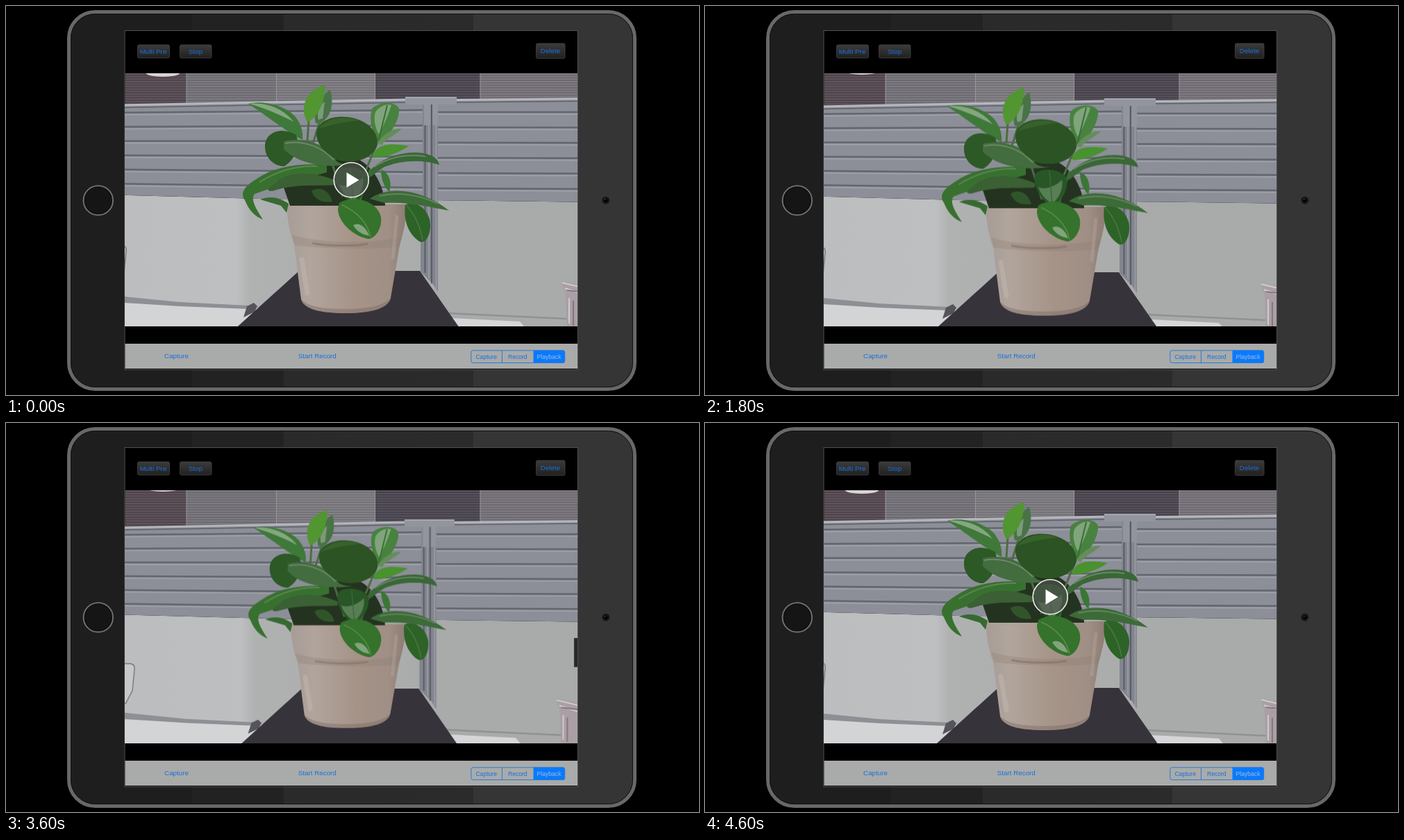
Write an HTML page that moves like this. It is 998 by 561 pixels and loops after 4.8 s.

```html
<!DOCTYPE html>
<html lang="en">
<head>
<meta charset="utf-8">
<title>Tablet camera playback</title>
<style>
  html, body { margin: 0; width: 100%; height: 100%; overflow: hidden; background: #000; }
  svg { display: block; width: 998px; height: 561px; }
  text { font: 9.8px "Liberation Sans", Arial, sans-serif; fill: #1a70dc; text-anchor: middle; }
  .seg text { font-size: 8.6px; }
  .photo, .play, .wall, .plant, .lamp { animation: 4800ms step-end infinite; }
  .photo { animation-name: photo; }
  .play { animation-name: play; }
  .wall { animation-name: wall; }
  .plant { animation-name: plant; }
  .lamp { animation-name: lamp; }

  @keyframes photo {
    0%, 37.5%, 87.5%, 100% { visibility: visible; }
    16.66%, 79.16% { visibility: hidden; }
  }
  @keyframes play {
    0%, 79.16%, 100% { visibility: visible; }
    29.16% { visibility: hidden; }
  }
  @keyframes lamp {
    0%, 87.5%, 100% { transform: translate(0, 0); }
    37.5% { transform: translate(0, -3px); }
  }
  /* The hand-held clip drifts back, at five pictures a second */
  @keyframes wall {
    0%, 87.5%, 100% { transform: translate(0, 0) scale(1, 1); }
    37.5% { transform: translate(0, 2px) scale(1, 1); animation-timing-function: steps(3); }
    50% { transform: translate(6px, 7px) scale(.992, .992); animation-timing-function: steps(4); }
    66.66% { transform: translate(17.5px, 11.7px) scale(.968, .972); }
  }
  @keyframes plant {
    0%, 87.5%, 100% { transform: translate(0, 0) scale(1, 1); }
    37.5% { transform: translate(0, 3.6px) scale(1, 1); animation-timing-function: steps(3); }
    50% { transform: translate(9.5px, 11px) scale(.987, .984); animation-timing-function: steps(4); }
    66.66% { transform: translate(21.7px, 16.5px) scale(.96, .956); }
  }
</style>
</head>
<body>
<svg viewBox="0 0 998 561">
  <defs>
    <linearGradient id="bezel" gradientUnits="userSpaceOnUse" x1="0" x2="1000" y1="0" y2="0">
      <stop offset=".268" stop-color="#1e1e1e"/><stop offset=".268" stop-color="#222"/>
      <stop offset=".4" stop-color="#222"/><stop offset=".4" stop-color="#2a2a2a"/>
      <stop offset=".673" stop-color="#2b2b2b"/><stop offset=".673" stop-color="#353535"/>
    </linearGradient>
    <linearGradient id="key" x2="0" y2="1">
      <stop offset="0" stop-color="#3b3b3b"/><stop offset="1" stop-color="#212121"/>
    </linearGradient>
    <linearGradient id="clay">
      <stop offset="0" stop-color="#a79d96"/><stop offset=".2" stop-color="#b1a59d"/>
      <stop offset=".55" stop-color="#a69488"/><stop offset=".85" stop-color="#a08f85"/>
      <stop offset="1" stop-color="#8b7b72"/>
    </linearGradient>
    <linearGradient id="lowLeft">
      <stop offset="0" stop-color="#bcbdbf"/><stop offset=".4" stop-color="#bebfc0"/>
      <stop offset=".44" stop-color="#b0b2b2"/><stop offset="1" stop-color="#aaacac"/>
    </linearGradient>
    <pattern id="blind" width="8" height="3.6" patternUnits="userSpaceOnUse">
      <path d="M0 1H8" stroke="#fff" stroke-opacity=".13"/>
      <path d="M0 2.8H8" stroke="#000" stroke-opacity=".17"/>
    </pattern>
    <clipPath id="frame"><rect x="171.5" y="97" width="651.5" height="364.5"/></clipPath>
  </defs>

  <rect width="998" height="561"/>
  <rect x="90.5" y="8.5" width="815" height="544" rx="38" fill="url(#bezel)" stroke="#686868" stroke-width="5"/>
  <rect x="93.5" y="11.5" width="809" height="538" rx="35" fill="none" stroke="#111"/>
  <rect x="171" y="35.5" width="652.5" height="489" stroke="#505050"/>

  <circle cx="132.8" cy="280.4" r="21.2" fill="#0b0b0b" stroke="#707070" stroke-width="2"/>
  <circle cx="132.8" cy="280.4" r="19" fill="#151515"/>
  <circle cx="863.8" cy="280.2" r="5.5" fill="#161616"/>
  <circle cx="863.8" cy="280.2" r="2.6" fill="#000"/>
  <circle cx="862.8" cy="279" r="1" fill="#3b3f3c"/>

  <g class="photo" clip-path="url(#frame)">
    <g>
      <path d="M171 97H260V160H171z" fill="#564951"/>
      <path d="M260 97H389V160H260z" fill="#75727a"/>
      <path d="M389 97H531V160H389z" fill="#7d7b80"/>
      <path d="M531 97H683V160H531z" fill="#4b4650"/>
      <path d="M683 97H823V160H683z" fill="#77727a"/>
      <path d="M171 97H823V160H171z" fill="url(#blind)"/>
      <path d="M260 97V150M389.5 97V150M531.5 97V150M683 97V150" stroke="#99979d"/>
      <ellipse class="lamp" cx="226" cy="97" rx="24" ry="5" fill="#d8d5d6"/>
    </g>

    <g class="wall">
      <path d="M140 272L400 279H620V480H140z" fill="url(#lowLeft)"/>
      <path d="M616 280L850 283V480H616z" fill="#a8aba9"/>
      <path d="M140 143.5L576 134H620V281L400 279L140 272z" fill="#8c8e98"/>
      <path d="M616 136L850 133V283L616 280z" fill="#8c8e98"/>
      <g id="slats"></g>
      <path d="M140 143.5L578 135" stroke="#b6b8be" stroke-width="3"/>
      <path d="M645 135.5L850 133.5" stroke="#b6b8be" stroke-width="3"/>
      <path d="M140 147L578 139M645 139L850 137" stroke="#5e606a" stroke-width="1.5"/>

      <path d="M600 135H622V412L614 400L597 383V281H600z" fill="#83858e"/>
      <path d="M603.5 146V385M613 140V400" stroke="#595b65" stroke-width="2"/>
      <path d="M609 140V392M619.5 146V408" stroke="#9799a2" stroke-width="2"/>
      <path d="M575 131.5H649V142H622V172H614V142H611V172H602V142H575z" fill="#92959d"/>
      <path d="M575 132H649" stroke="#b0b2b9" stroke-width="1.5"/>

      <path d="M140 427L370 436V490H140z" fill="#d3d4d6"/>
      <path d="M140 416L250 427L350 432V437L250 433L140 426z" fill="#8d8f95"/>
      <path d="M640 450L740 455L748 464V490H640z" fill="#d5d6d7"/>
      <path d="M636 443L850 453" stroke="#8f9196" stroke-width="2.5"/>
      <path d="M150 345H167Q174 346 173 354L170 385L160 404H150z" fill="#c7c8ca" stroke="#77797e" stroke-width="1.5"/>
      <path d="M827 307H850V350H827z" fill="#28272c"/>

      <path d="M800 397L850 406V475H808L806 415z" fill="#a99fa5"/>
      <path d="M801 399L850 411M805 407L850 422M811 421V458" stroke="#d0cbd0" stroke-width="2"/>
      <path d="M808 410L850 415M817 425V461" stroke="#85767f" stroke-width="2"/>

      <path d="M342 449L347 433L357 428L362 433L358 441z" fill="#55545b"/>
      <path d="M314 480L422 382H596L664 480z" fill="#37333b"/>
    </g>

    <g class="plant">
      <path d="M404 286H578C577 306 572 328 567 345L554 421C551 436 526 443 489 443C452 443 429 437 425 423L415 345C409 330 405 308 404 286z" fill="url(#clay)"/>
      <path d="M412 330C450 342 520 344 570 333L567 347C525 352 450 350 416 345z" fill="#8d7a70" opacity=".3"/>
      <path d="M441 342C460 346 500 347 521 343" fill="none" stroke="#806a60" stroke-width="3" opacity=".5"/>
      <path d="M426 366L434 414" stroke="#c8bfb8" stroke-width="7" stroke-linecap="round" opacity=".4"/>
      <path d="M563 302L557 365" stroke="#bfb4ac" stroke-width="5" opacity=".3"/>
      <path d="M425 423C429 437 452 443 489 443C526 443 551 436 554 421C545 432 520 437 489 437C455 437 435 433 425 423z" fill="#75645c" opacity=".4"/>

      <path d="M400 262C415 240 455 218 500 218C530 228 545 262 546 288H409z" fill="#24331f"/>
      <path d="M436 165L434 194M452 166L442 198M535 196L517 240M470 228L485 275M525 235L510 280" fill="none" stroke="#4d6c42" stroke-width="3"/>
      <path d="M446 169C440 150 455 128 467 121C472 140 470 158 452 170z" fill="#487346"/>
      <path d="M450 164C446 152 454 141 459 138L456 162z" fill="#93ab92" opacity=".7"/>
      <path d="M434 168C424 150 427 124 459 114C460 135 452 158 434 168z" fill="#519631"/>
      <path d="M349 141C375 135 405 146 417 160C426 172 428 182 427 193C405 182 375 158 349 141z" fill="#3f7939"/>
      <path d="M351 141C376 138 402 150 414 167C398 158 374 148 351 141z" fill="#a3b9a0" opacity=".7"/>
      <path d="M418 186C400 174 374 180 373 201C372 220 388 232 401 231C415 222 424 205 418 186z" fill="#2c5926"/>
      <path d="M527 148C540 136 562 138 566 148C567 165 552 190 535 198C528 180 522 165 527 148z" fill="#47823f"/>
      <path d="M532 153C539 143 550 141 555 143C549 162 541 178 537 185C531 175 529 162 532 153z" fill="#9fb79c" opacity=".65"/>
      <path d="M549 143L536 196" stroke="#396d35" stroke-width="2"/>
      <path d="M534 198C545 183 558 176 570 177C562 185 551 189 541 200z" fill="#648d5b"/>
      <path d="M529 219C530 200 550 197 580 202C565 212 548 218 529 219z" fill="#48922f"/>
      <path d="M518 247C530 222 570 208 600 212C615 215 622 220 624 229C600 221 570 222 545 232C535 238 528 246 518 250z" fill="#3a6736"/>
      <path d="M530 232C552 218 578 213 604 217" fill="none" stroke="#7d9679" stroke-width="2" opacity=".7"/>

      <path d="M462 229C420 226 385 232 360 250C340 262 338 272 344 280C350 295 358 303 370 308C359 291 352 279 358 271C378 264 405 255 462 240z" fill="#38712f"/>
      <path d="M448 231C420 230 393 236 365 254" fill="none" stroke="#6b8f60" stroke-width="2" opacity=".7"/>
      <path d="M475 252C440 236 400 240 388 256C372 264 376 270 390 265C420 256 455 260 475 258z" fill="#3a6034"/>
      <path d="M366 279C380 273 394 276 407 285L404 298L396 288z" fill="#366a30"/>
      <path d="M440 267C450 260 465 264 470 282C458 284 445 281 440 267z" fill="#31552a"/>
      <path d="M400 195C430 188 462 200 474 220C475 227 490 230 500 228C470 234 420 230 400 206z" fill="#436c3f"/>
      <path d="M402 198C430 193 456 204 472 222" fill="none" stroke="#7d9679" stroke-width="2" opacity=".7"/>
      <path d="M447 184C448 162 480 155 505 163C528 170 540 190 533 205C524 222 500 228 477 222C460 212 447 200 447 184z" fill="#2c5323"/>
      <path d="M450 177C462 160 490 158 508 165C490 167 468 171 450 177z" fill="#37632b"/>
      <path d="M540 236C552 240 556 255 552 268C545 262 540 250 540 236z" fill="#3a7634"/>
      <path d="M575 287C590 278 612 295 611 318C610 335 603 342 596 340C580 330 572 310 575 287z" fill="#2d6327"/>
      <path d="M577 288C588 300 596 316 600 337" fill="none" stroke="#4b7a3f" stroke-width="1.5"/>
      <path d="M524 278C550 258 600 264 638 295C610 290 580 282 545 284z" fill="#3d6b38"/>
      <path d="M538 274C565 267 597 273 622 285" fill="none" stroke="#748f70" stroke-width="2" opacity=".7"/>
      <path d="M475 240C480 230 510 228 521 245C524 262 512 280 500 286C485 278 472 258 475 240z" fill="#295626"/>
      <path d="M480 257C488 263 506 256 514 247C517 262 507 277 500 281C490 276 483 267 480 257z" fill="#88a586" opacity=".5"/>
      <path d="M496 234L500 284" stroke="#3a6a35" stroke-width="1.5"/>
      <path d="M480 284C500 272 535 280 540 305C542 322 530 336 522 336C500 332 478 312 478 292z" fill="#35722c"/>
      <path d="M484 287C505 296 521 313 525 333" fill="none" stroke="#5b8d4d" stroke-width="1.5"/>
      <path d="M500 316C508 311 518 318 523 331C513 330 505 325 500 316z" fill="#a3b9a0" opacity=".7"/>
    </g>
  </g>

  <g class="play">
    <circle cx="497.2" cy="250.8" r="25" fill="#555" fill-opacity=".6" stroke="#eee" stroke-width="1.6"/>
    <path d="M490.5 240V261.8L508.5 250.9z" fill="#fff"/>
  </g>

  <g fill="url(#key)" stroke="#444" stroke-width=".8">
    <rect x="189.5" y="56" width="46" height="19" rx="2"/>
    <rect x="250.5" y="56" width="45.5" height="19" rx="2"/>
    <rect x="763.5" y="54" width="41.5" height="21.5" rx="2"/>
  </g>
  <text x="212" y="69">Multi Pre</text>
  <text x="273" y="69">Stop</text>
  <text x="784" y="68.4">Delete</text>

  <rect x="171.5" y="487" width="651.5" height="36" fill="#a8abaa"/>
  <text x="245.5" y="508.2">Capture</text>
  <text x="448.3" y="508.2">Start Record</text>
  <g class="seg">
    <path d="M759.5 496.5H802Q805 496.5 805 499.5V512Q805 515 802 515H759.5z" fill="#087aff"/>
    <rect x="669.8" y="496.8" width="134.9" height="17.8" rx="3" fill="none" stroke="#2f78d2"/>
    <path d="M714.5 497V514.5" stroke="#2f78d2"/>
    <text x="691.7" y="508.8">Capture</text>
    <text x="736.8" y="508.8">Record</text>
    <text x="782" y="508.8" style="fill:#a8bbd2">Playback</text>
  </g>
</svg>
<script>
  const slats = document.getElementById("slats");
  const line = (x1, y1, x2, y2, color, width) => slats.insertAdjacentHTML("beforeend",
    `<path d="M${x1} ${y1}L${x2} ${y2}" stroke="${color}" stroke-width="${width}"/>`);
  const lerp = (a, b, k) => a + (b - a) * k;

  // Slats fan out slightly across each partition
  function panel(x1, x2, top1, top2, end1, end2, count) {
    for (let i = 0; i < count; i++) {
      const k = i / (count - 1);
      const y1 = lerp(top1, end1, k), y2 = lerp(top2, end2, k);
      line(x1, y1, x2, y2, "#64666f", 2.6);
      line(x1, y1 + 3, x2, y2 + 3, "#9d9fa8", 2);
    }
  }
  panel(140, 600, 154, 150, 256, 262, 6);
  panel(622, 850, 153, 153, 263, 264, 6);
</script>
</body>
</html>
```
